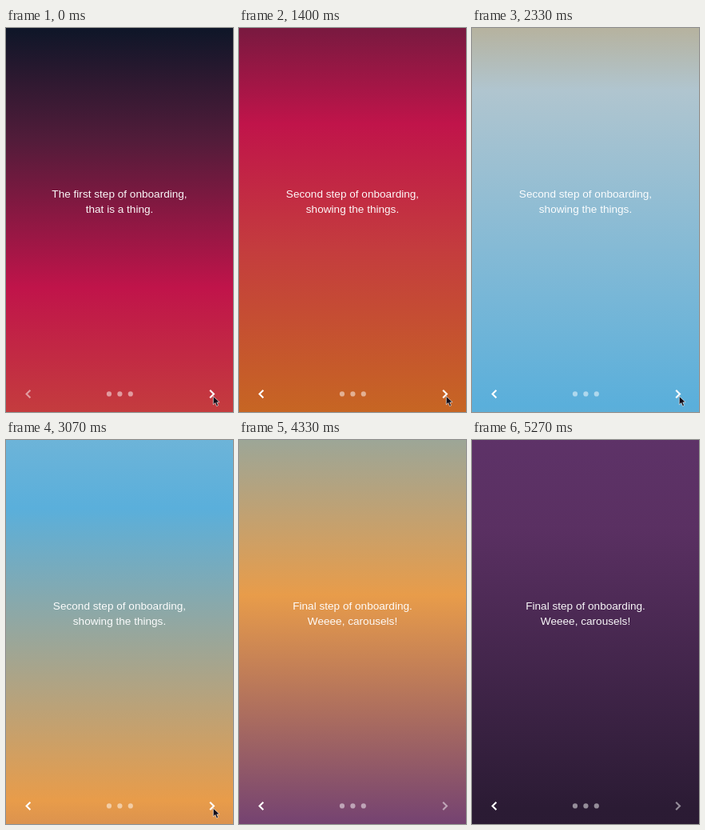
An HTML page with a canvas that plays this animation: 284x480 px, repeating every 5340 ms.

```html
<!DOCTYPE html>
<html lang="en">
<head>
<meta charset="utf-8">
<title>Onboarding carousel</title>
<style>
  html, body { margin: 0; width: 100%; height: 100%; overflow: hidden; background: #0e1628; }
  canvas { display: block; width: 284px; height: 480px; }
</style>
</head>
<body>
<canvas id="stage" width="284" height="480"></canvas>
<script>
const W = 284, H = 480, LOOP = 5340, TICK = 200 / 3;
const ctx = document.getElementById('stage').getContext('2d');

const SLIDES = [
  ['The first step of onboarding,', 'that is a thing.'],
  ['Second step of onboarding,', 'showing the things.'],
  ['Final step of onboarding.', 'Weeee, carousels!']
];
const CLICKS = [835, 3715];
const SLIDE_MS = 300;
const FADE_MS = 400;
const DIM = 0.5;

// Tall sky strip: [y, colour]
const SKY_HEIGHT = 3300;
const SKY = [
  [0, '14,22,40'], [140, '82,28,58'], [325, '192,20,74'], [480, '196,60,62'],
  [800, '200,125,20'], [1100, '176,197,207'], [1495, '90,175,219'],
  [1860, '232,156,74'], [2180, '103,56,118'], [2580, '90,48,98'],
  [2930, '43,27,52'], [SKY_HEIGHT, '36,23,44']
];

// Sky travel after a click: [ms, distance, speed]
const TRAVEL = [
  [0, 0, 0], [220, 10, 0.15], [565, 205, 0.95],
  [965, 590, 0.93], [1495, 1020, 0.68], [2250, 1410, 0]
];

const clamp = v => Math.max(0, Math.min(1, v));
const smooth = p => p * p * (3 - 2 * p);
const mix = (a, b, p) => a + (b - a) * p;

function travel(ms) {
  if (ms <= 0) return 0;
  const i = TRAVEL.findIndex(k => k[0] >= ms);
  if (i < 0) return TRAVEL[TRAVEL.length - 1][1];
  const [t0, p0, v0] = TRAVEL[i - 1], [t1, p1, v1] = TRAVEL[i];
  const h = t1 - t0, u = (ms - t0) / h, w = 1 - u;
  return mix(p0, p1, smooth(u)) + h * u * w * (v0 * w - v1 * u);
}

function drawSky(offset) {
  const g = ctx.createLinearGradient(0, -offset, 0, SKY_HEIGHT - offset);
  for (const [y, rgb] of SKY) g.addColorStop(y / SKY_HEIGHT, `rgb(${rgb})`);
  ctx.fillStyle = g;
  ctx.fillRect(0, 0, W, H);
}

function drawSlides(position) {
  ctx.font = '13.6px "Liberation Sans", Helvetica, Arial, sans-serif';
  ctx.textAlign = 'center';
  ctx.fillStyle = 'rgba(255,255,255,0.96)';
  SLIDES.forEach((lines, i) => {
    const x = W / 2 + (i - position) * W;
    if (Math.abs(x - W / 2) >= W) return;
    lines.forEach((line, row) => ctx.fillText(line, x, 212 + row * 18.5));
  });
}

function drawChevron(tipX, dir, alpha) {
  ctx.strokeStyle = `rgba(255,255,255,${alpha})`;
  ctx.lineWidth = 2.1;
  ctx.beginPath();
  ctx.moveTo(tipX - dir * 4.8, 452.7);
  ctx.lineTo(tipX, 457.5);
  ctx.lineTo(tipX - dir * 4.8, 462.3);
  ctx.stroke();
}

function drawDots() {
  ctx.fillStyle = 'rgba(255,255,255,0.5)';
  for (const x of [129, 142.4, 155.8]) {
    ctx.beginPath();
    ctx.arc(x, 457.4, 3.1, 0, Math.PI * 2);
    ctx.fill();
  }
}

function drawCursor(x, y) {
  const outline = [[0, 0], [0, 10.5], [2.5, 8.3], [4.2, 12.4], [6.2, 11.5], [4.5, 7.6], [7.8, 7.4]];
  ctx.beginPath();
  outline.forEach(([dx, dy]) => ctx.lineTo(x + dx, y + dy));
  ctx.closePath();
  ctx.fillStyle = '#120d18';
  ctx.fill();
  ctx.strokeStyle = 'rgba(255,255,255,0.75)';
  ctx.lineWidth = 0.8;
  ctx.stroke();
}

function draw(t) {
  const since = CLICKS.map(c => t - c);
  const sum = f => since.reduce((total, ms) => total + f(ms), 0);
  const fade = since.map(ms => clamp(ms / FADE_MS));

  drawSky(sum(travel));
  drawSlides(sum(ms => smooth(clamp(ms / SLIDE_MS))));
  drawDots();
  drawChevron(30.4 - 4.8, -1, mix(DIM, 1, fade[0]));
  drawChevron(260, 1, mix(1, DIM, fade[1]));

  const leave = clamp((t - 4090) / 180);
  if (leave < 1) drawCursor(259.3 + 26 * leave, 460.3 + 22 * leave);
}

const start = performance.now();
function frame() {
  const t = (performance.now() - start) % LOOP;
  draw(Math.floor((t + 4) / TICK) * TICK);
  requestAnimationFrame(frame);
}
frame();
</script>
</body>
</html>
```
